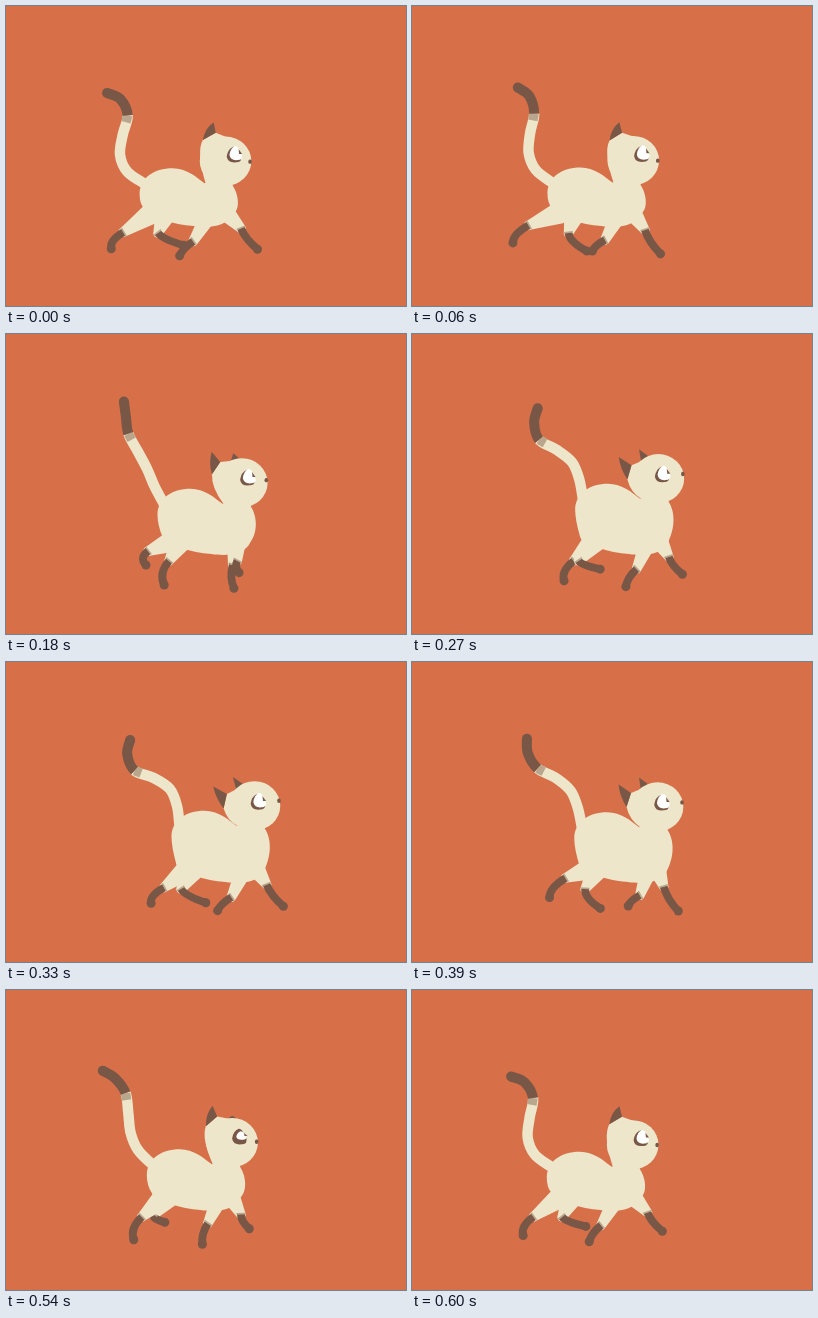
An HTML page with a canvas for the animation above (630 ms loop, 400 by 300 pixels).

```html
<!DOCTYPE html>
<html lang="en">
<head>
<meta charset="utf-8">
<title>Walking cat</title>
<style>
html, body { margin: 0; width: 100%; height: 100%; overflow: hidden; background: #d76f49; }
canvas { display: block; }
</style>
</head>
<body>
<canvas id="stage" width="400" height="300"></canvas>
<script>
const ctx = document.getElementById('stage').getContext('2d');
const LOOP = 630, STEP = 30;
const BG = '#d76f49', CREAM = '#ede6ca', BROWN = '#785747', TAN = '#b9a68d';
const RAD = Math.PI / 180;

// Cosine over the loop that is 1 at the time `peak`.
const wave = (t, peak, times = 1) => Math.cos(2 * Math.PI * times * (t - peak) / LOOP);
// Smooth periodic pulse, 1 at `peak`; larger n is narrower.
const pulse = (t, peak, n) => ((1 + wave(t, peak)) / 2) ** n;

function fill(color, path) {
  ctx.fillStyle = color;
  ctx.beginPath();
  path();
  ctx.fill();
}

const dot = (color, x, y, rx, ry = rx) =>
  fill(color, () => ctx.ellipse(x, y, rx, ry, 0, 0, 7));

const polygon = (color, ...points) =>
  fill(color, () => points.forEach(p => ctx.lineTo(...p)));

function stroke(color, width, path) {
  ctx.strokeStyle = color;
  ctx.lineWidth = width;
  ctx.beginPath();
  path();
  ctx.stroke();
}

// Smooth stroke through a list of points, from index `from` to index `to`.
function curve(color, width, pts, from, to) {
  const p = i => pts[Math.max(0, Math.min(pts.length - 1, i))];
  stroke(color, width, () => {
    ctx.moveTo(...p(from));
    for (let i = from; i < to; i++) {
      const [a, b, c, d] = [p(i - 1), p(i), p(i + 1), p(i + 2)];
      ctx.bezierCurveTo(
        b[0] + (c[0] - a[0]) / 6, b[1] + (c[1] - a[1]) / 6,
        c[0] - (d[0] - b[0]) / 6, c[1] - (d[1] - b[1]) / 6, ...c);
    }
  });
}

// Each tail segment swings about its own mean angle: length, mean, swing, peak time.
const tailSegments = [
  [20, -31, 24, 325], [18.5, -23, 0, 0], [20, -24, 32, 10],
  [20, -27, 42, 20], [18, -23, 15, 165], [14.5, -26, 41, 290]
];

function tail(x, y, t) {
  const pts = [[x, y]];
  for (const [length, mean, swing, peak] of tailSegments) {
    const a = (mean + swing * wave(t, peak)) * RAD;
    pts.push([x += length * Math.sin(a), y -= length * Math.cos(a)]);
  }
  const [joint, below] = [pts[4], pts[3]];
  curve(CREAM, 10.5, pts, 0, 4);
  stroke(TAN, 9.5, () => {
    ctx.moveTo(...joint);
    ctx.lineTo(joint[0] + (below[0] - joint[0]) * .35, joint[1] + (below[1] - joint[1]) * .35);
  });
  curve(BROWN, 10, pts, 4, 6);
  dot(BROWN, x, y, 5);
}

// Thigh tapering from the hip to the sock, then the sock and paw.
function leg([hipX, hipY, hipR], [x, y], [pawX, pawY], bow) {
  const a = Math.atan2(y - hipY, x - hipX), q = Math.PI / 2;
  const bendX = (x + pawX) / 2 - bow, bendY = (y + pawY) / 2;
  fill(CREAM, () => {
    ctx.arc(hipX, hipY, hipR, a + q, a + 3 * q);
    ctx.arc(x, y, 4.8, a - q, a + q);
  });
  const sock = () => {
    ctx.moveTo(x, y);
    ctx.quadraticCurveTo(bendX, bendY, pawX, pawY);
  };
  const d = Math.hypot(bendX - x, bendY - y);
  stroke(TAN, 9, () => {
    ctx.moveTo(x, y);
    ctx.lineTo(x - 1.5 * (bendX - x) / d, y - 1.5 * (bendY - y) / d);
  });
  stroke(BROWN, 7.8, sock);
  dot(BROWN, pawX, pawY, 4.5);
}

// The far legs walk half a loop out of step with the near ones.
function rearLeg(left, t, shift) {
  const x = shift - 4 + 15 * wave(t, 375);
  const pawX = shift - 3 + 33 * wave(t, 350) + 6 * wave(t, 300, 2);
  leg([left + 19 + .4 * x, 207, 11],
    [left + x, 227 - 18 * pulse(t, 125, 8)],
    [left + pawX, 241 + 10 * wave(t, 490)], 8);
}

function frontLeg(left, t, shift) {
  const x = shift + 74.5 + 21 * wave(t, 312);
  leg([left + 48 + .4 * x, 209, 8.5],
    [left + x, 229 - 6.5 * wave(t, 305)],
    [left + shift + 76 + 36 * wave(t, 322), 246.5 + 8 * wave(t, 515)], 4);
}

function body(x, y) {
  const h = 220 - y;
  ctx.save();
  ctx.translate(x, y);
  fill(CREAM, () => {
    ctx.moveTo(0, 26);
    ctx.bezierCurveTo(0, 10, 14, 0, 33, 0);
    ctx.bezierCurveTo(47, 0, 57, 9, 65, 15);
    ctx.lineTo(88, 6);
    ctx.lineTo(94, 19);
    ctx.bezierCurveTo(99, 27, 101, 42, 93, h - 12);
    ctx.bezierCurveTo(87, h + 2, 66, h + 2, 54, h);
    ctx.quadraticCurveTo(38, h - 1, 24, h - 6);
    ctx.quadraticCurveTo(8, h - 8, 5, h - 17);
    ctx.quadraticCurveTo(0, 36, 0, 26);
  });
  ctx.restore();
}

function eye(x, y, open) {
  const shape = (color, dx, dy, sx, sy) => {
    ctx.save();
    ctx.translate(x + dx, y + dy);
    ctx.scale(sx, sy);
    fill(color, () => {
      ctx.moveTo(-1, -8);
      ctx.quadraticCurveTo(2, -8, 4, -3);
      ctx.quadraticCurveTo(9, 4, 4, 6);
      ctx.quadraticCurveTo(-6, 8, -7, 1);
      ctx.quadraticCurveTo(-6, -6, -1, -8);
    });
    ctx.restore();
  };
  shape(BROWN, -1.3, 1.6, 1.08, 1.08);
  shape('#fff', .5, 0, .45 + open / 2, open);
  polygon(BROWN, [x + 3, y - 5 * open], [x + 6.5, y], [x + 3.5, y]);
}

// The ears turn around the head centre as it leans.
function head(x, y, notch, sway, t) {
  const lean = 41 - 24 * sway;
  const polar = (r, turn) => {
    const a = (lean + turn) * RAD;
    return [x - r * Math.sin(a), y - r * Math.cos(a)];
  };
  const tip = polar(43 - 2.5 * sway, 0), outer = polar(31, 30), inner = polar(30, 2);
  polygon(BROWN, polar(30 - 6 * sway, -28), polar(24, -16), polar(25, -37));
  fill(CREAM, () => {
    ctx.moveTo(...inner);
    ctx.lineTo(...outer);
    ctx.quadraticCurveTo(...polar(31, 55), ...notch);
    ctx.lineTo(x, y + 20);
    ctx.lineTo(...polar(24, -20));
  });
  dot(CREAM, x, y, 25.8, 24.6);
  fill(BROWN, () => {
    ctx.moveTo(...tip);
    ctx.quadraticCurveTo(...polar(39, 15), ...outer);
    ctx.lineTo(...inner);
  });
  dot(BROWN, x + 24.5, y - 2.3 + 2.8 * sway, 1.8, 2.2);
  eye(x + 7.5 + 2.5 * sway, y - 6 - 1.3 * sway, 1 - .5 * pulse(t, 515, 12));
}

function draw(t) {
  const sway = wave(t, 10), half = t + LOOP / 2;
  const x = 149.5 - 16 * sway, y = 155.5 + 6.7 * sway;
  ctx.fillStyle = BG;
  ctx.fillRect(0, 0, 400, 300);
  tail(x + 6 - 2 * sway, y + 15, t);
  rearLeg(x, half, 10);
  frontLeg(x, half, 6);
  body(x, y);
  rearLeg(x, t, 0);
  frontLeg(x, t, 0);
  head(x + 84.5 + 1.5 * sway, y - 6 - sway, [x + 66, y + 15], sway, t);
}

function frame() {
  draw(Math.floor(performance.now() % LOOP / STEP) * STEP);
  requestAnimationFrame(frame);
}
frame();
</script>
</body>
</html>
```
